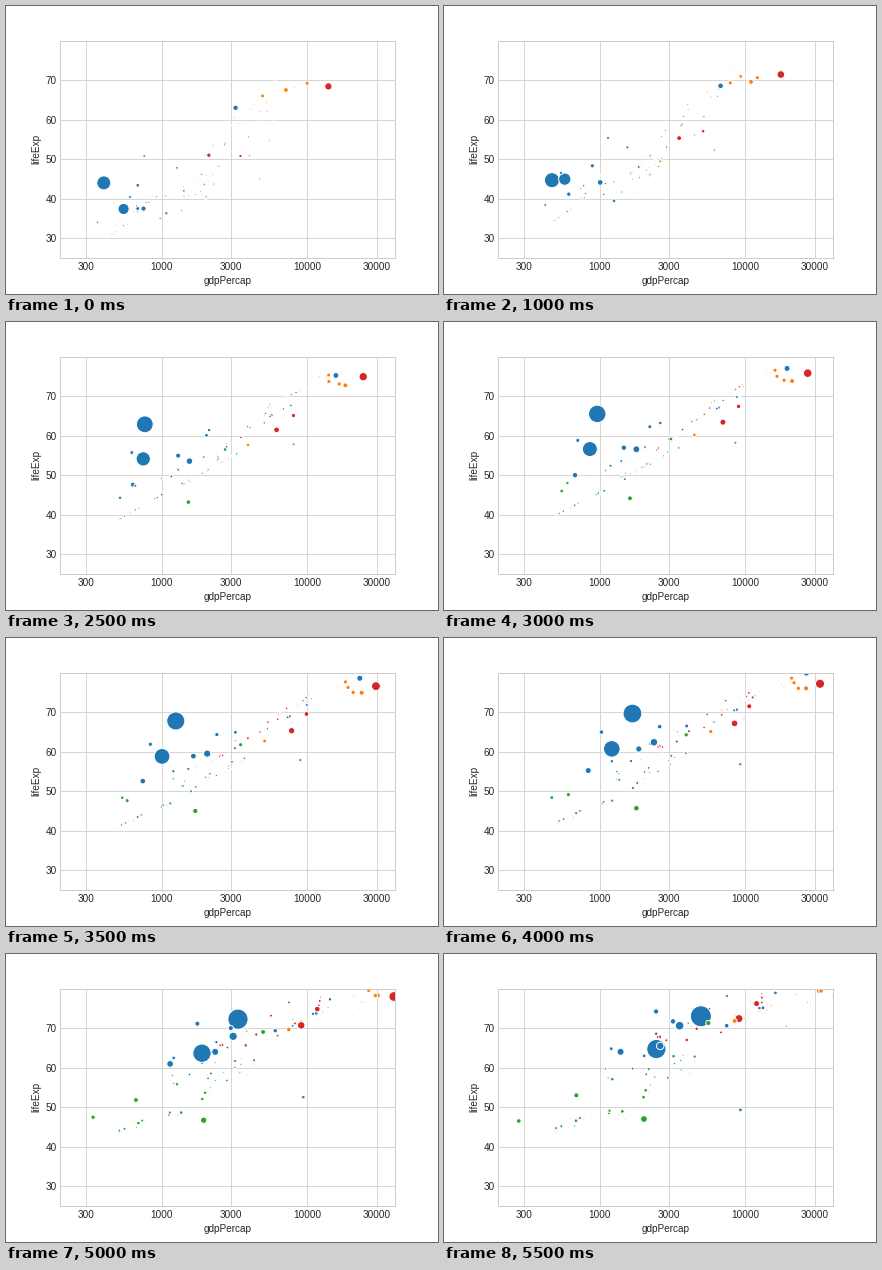
These frames come from a looping animation (432 by 288 pixels, 6000 ms). A matplotlib script:

```python
import numpy as np
import matplotlib.pyplot as plt
from matplotlib.animation import FuncAnimation

STEPS = np.arange(12)  # 1952 to 2007, every five years
KEYS = [0, 6, 11]
# Weights of the parabola through start, middle and end
BEND = np.vander(STEPS, 3) @ np.linalg.inv(np.vander(KEYS, 3))
ASIA, EUROPE, AFRICA, AMERICAS = (f"C{i}" for i in range(4))
PEOPLE_PER_AREA = 3  # millions per square point

rng = np.random.default_rng(12)
colors, paths, sizes = [], [], []


def point(gdp, life):
    return np.array([np.log10(gdp), life])


def add(color, pop, start, end, mid=None, famine=0):
    """A dot on a parabola, by default bulging towards early progress."""
    if mid is None:
        mid = (start + end) / 2 + [0.04, 2.5]
    path = BEND @ [start, mid, end]
    path[:, 1] -= famine * np.exp(-3 * (STEPS - 2) ** 2)
    path[:, 0] = 10 ** path[:, 0]
    colors.append(color)
    paths.append(path)
    sizes.append(np.geomspace(*pop, len(STEPS)) / PEOPLE_PER_AREA)


def country(color, pop, start, end, mid=None, famine=0):
    add(color, pop, point(*start), point(*end), mid and point(*mid), famine)


def region(color, count, growth, poor, rich, poor_end, rich_end):
    """Smaller countries between a poor and a rich corner of the cloud."""
    poor, rich, poor_end, rich_end = (
        point(*p) for p in (poor, rich, poor_end, rich_end))
    for _ in range(count):
        u = rng.random()
        v = np.clip(u + rng.normal(0, 0.2), 0, 1)
        pop = 2 * 8 ** rng.random()
        start = poor + (rich - poor) * [u, v]
        end = poor_end + (rich_end - poor_end) * [v, u]
        add(color, (pop, pop * growth), start, end)


region(AFRICA, 36, 3, (400, 31), (2500, 46), (500, 43), (4500, 64))
region(EUROPE, 20, 1.2, (3000, 59), (12000, 73), (8500, 72), (38000, 81))
region(ASIA, 18, 3, (550, 35), (4000, 60), (1200, 59), (28000, 79))
region(AMERICAS, 16, 2.8, (1700, 40), (6000, 62), (2500, 66), (13000, 79))

country(ASIA, (47, 150), (684, 37.5), (1391, 64), mid=(677, 50))
country(AMERICAS, (57, 190), (2109, 51), (9066, 72.4), mid=(7031, 63.4))
country(ASIA, (590, 1319), (400, 44), (4959, 73), mid=(962, 65.5), famine=8)
country(AFRICA, (14, 65), (781, 39), (278, 46.5), mid=(600, 48))
country(AFRICA, (22, 80), (1419, 42), (5581, 71.3))
country(AFRICA, (21, 77), (362, 34), (691, 53))
country(EUROPE, (42, 61), (7030, 67.4), (30470, 80.7))
country(EUROPE, (69, 82), (7144, 67.5), (32170, 79.4), mid=(21000, 73.8))
country(ASIA, (372, 1110), (547, 37.4), (2452, 64.7), mid=(856, 56.6))
country(ASIA, (82, 224), (750, 37.5), (3541, 70.6))
country(EUROPE, (48, 58), (4931, 66), (28570, 80.5), mid=(16537, 75))
country(ASIA, (87, 128), (3217, 63), (31656, 82.6), mid=(19384, 77))
country(AMERICAS, (30, 109), (3478, 50.8), (11978, 76.2), mid=(9000, 67.4))
country(AFRICA, (33, 135), (1077, 36.3), (2014, 47))
country(ASIA, (41, 169), (685, 43.4), (2606, 65.5))
country(ASIA, (22, 91), (1273, 47.8), (3190, 71.7))
country(AFRICA, (14, 44), (4725, 45), (9270, 49.3), mid=(8568, 58.2))
country(ASIA, (21, 65), (758, 50.8), (7458, 70.6))
country(EUROPE, (22, 71), (1969, 43.6), (8458, 71.8))
country(EUROPE, (50, 61), (9980, 69.2), (33203, 79.4), mid=(18500, 74))
country(AMERICAS, (158, 301), (13990, 68.4), (42952, 78.2))
country(ASIA, (26, 85), (605, 40.4), (2442, 74.2), mid=(707, 58.8))

plt.style.use("seaborn-v0_8-whitegrid")
plt.rcParams.update({"font.family": "Liberation Sans", "font.size": 10})

fig, ax = plt.subplots(figsize=(6, 4), dpi=72)
fig.subplots_adjust(left=0.125, right=0.9, bottom=0.125, top=0.88)
dots = ax.scatter(*np.array(paths)[:, 0].T, c=colors,
                  edgecolors="white", linewidths=1)

ax.set_xscale("log")
ax.set(xlim=(200, 40000), ylim=(25, 80), xlabel="gdpPercap", ylabel="lifeExp")
ticks = [300, 1000, 3000, 10000, 30000]
ax.set_xticks(ticks, labels=[str(t) for t in ticks])
ax.set_yticks(range(30, 80, 10))
ax.minorticks_off()


def update(i):
    dots.set_offsets([path[i] for path in paths])
    dots.set_sizes([size[i] for size in sizes])
    return [dots]


anim = FuncAnimation(fig, update, frames=len(STEPS), interval=500,
                     init_func=lambda: update(0), repeat=True, repeat_delay=0)
plt.show()
```
